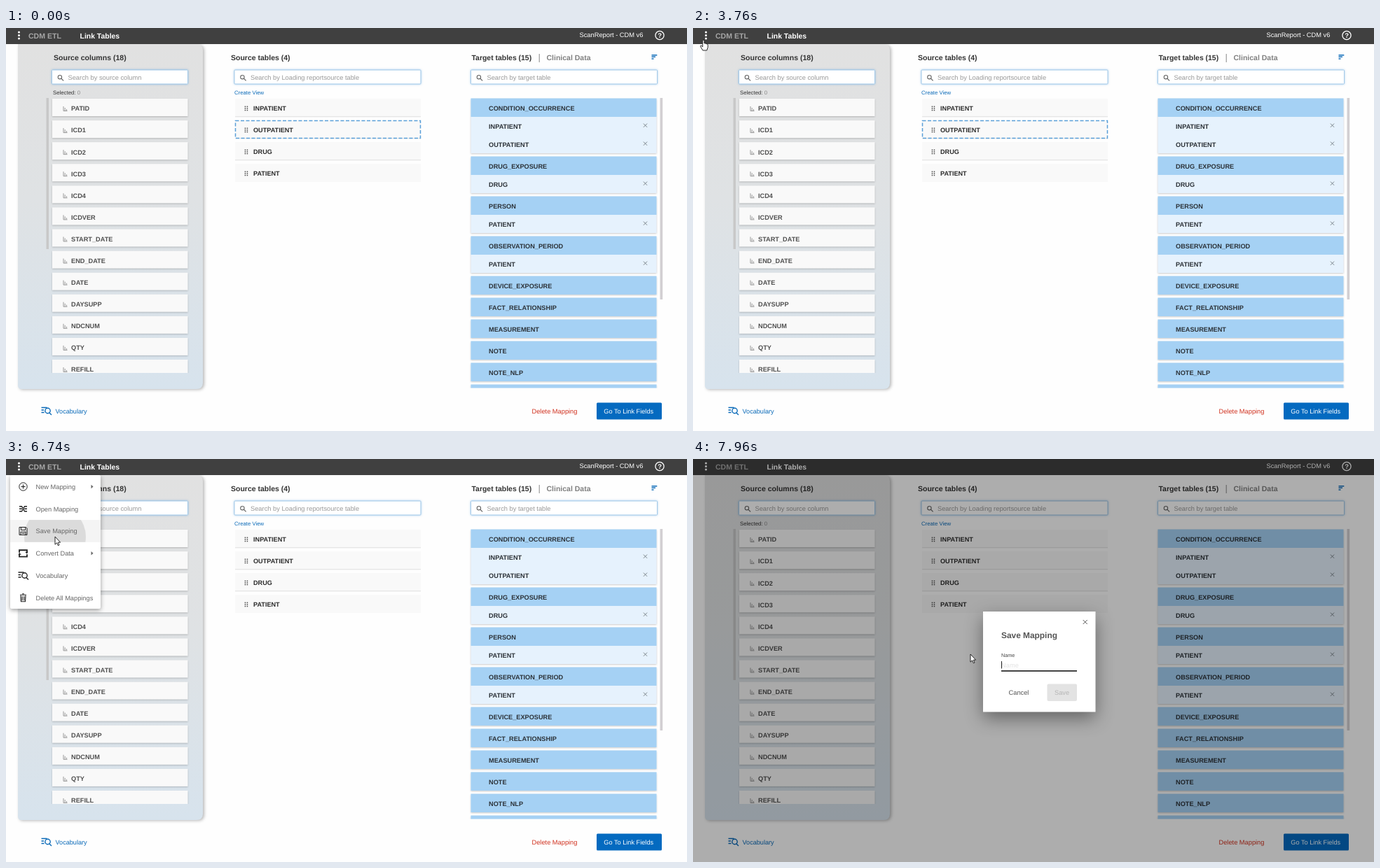
Animation, 972 px wide and 576 px high, one loop 8 s. Source, as an HTML page:

```html
<!DOCTYPE html>
<html lang="en">
<head>
<meta charset="utf-8">
<title>Link Tables</title>
<style>
  html, body { margin: 0; width: 100%; height: 100%; overflow: hidden; background: #fefefe; }
  svg { display: block; }
  text { font-family: "Liberation Sans", Arial, sans-serif; text-rendering: geometricPrecision; white-space: pre; }
  .panel { filter: drop-shadow(2px 1px 2px rgba(0,0,0,.28)); }
  .field { fill: #fff; stroke: #a3c9e8; filter: drop-shadow(0 0 1.5px rgba(70,150,215,.5)); }
  .card { filter: drop-shadow(0 1px 1px rgba(0,0,0,.2)); }
  .menu { filter: drop-shadow(0 2px 3px rgba(0,0,0,.38)); }
  .dialog { filter: drop-shadow(0 9px 13px rgba(0,0,0,.42)); }
</style>
</head>
<body>
<svg id="stage" width="972" height="576" viewBox="0 0 972 576"></svg>
<script>
const stage = document.getElementById('stage');
const LOOP = 8000;

// Drawing helpers
const text = (x, y, s, fill = '#333', size = 9.25, bold = false) =>
  `<text x="${x}" y="${y}" fill="${fill}" font-size="${size}"${bold ? ' font-weight="700"' : ''}>${s}</text>`;
const bold = (x, y, s, fill, size = 9.2) => text(x, y, s, fill, size, true);
const rect = (x, y, w, h, fill, extra = '') =>
  `<rect x="${x}" y="${y}" width="${w}" height="${h}" fill="${fill}" ${extra}/>`;
const line = (d, color, width = 1, extra = '') =>
  `<path d="${d}" fill="none" stroke="${color}" stroke-width="${width}" ${extra}/>`;
const at = (x, y, body) => `<g transform="translate(${x} ${y})">${body}</g>`;
const cross = (x, y, color, r = 2.6) =>
  at(x, y, line(`M${-r} ${-r}L${r} ${r}M${r} ${-r}L${-r} ${r}`, color, 1));
const lens = (x, y) => at(x, y, line('M1.6 1.6L4.6 4.6', '#666', 1.3) +
  '<circle cx="-.6" cy="-.6" r="2.7" fill="none" stroke="#666" stroke-width="1.1"/>');
const search = (x, w, hint) =>
  `<rect class="field" x="${x}" y="60" width="${w}" height="20" rx="1"/>` +
  lens(x + 12, 70.8) + text(x + 23, 73.5, hint, '#999', 9.3);

// Icons, centred on the origin
const icon = {
  vocabulary: c => line('M-7 -4.5H1M-7 -1H-3.5M-7 2.5H-3M4.2 2.8L7.5 6', c, 1.4) +
    `<circle cx="2" cy="0" r="3.7" fill="none" stroke="${c}" stroke-width="1.4"/>`,
  plus: c => `<circle r="5.7" fill="none" stroke="${c}"/>` + line('M-3 0H3M0 -3V3', c, 1.1),
  open: c => line('M-5.5 -3.5H-2L2 3.5H5.5M-5.5 3.5H-2L2 -3.5H5.5M-5.5 0H-1.5M1.5 0H5.5', c, 1.3),
  save: c => line('M-5.5 -5.5H4L5.5 -4V5.5H-5.5ZM-3 -5.5V-1.5H3V-5.5M-3.5 5.5V1.2H3.5V5.5M-2 3.3H2', c, 1),
  convert: c => line('M-5.5 -1V-4.5H5.5V-1M5.5 1.5V4.8H-5.5V1.5', c, 1.8) +
    `<path d="M2.6 -2H7L5.4 .8ZM-2.6 2H-7L-5.4 -.8Z" fill="${c}"/>`,
  trash: c => line('M-4.5 -4H4.5M-1.5 -5.5H1.5M-3.5 -3L-3 5.5H3L3.5 -3M-1.3 -2V4M1.3 -2V4', c, 1.2),
  scan: c => line('M-4.8 -1.5V-4.8H4.8V-1.5M-4.8 1.5V4.8H4.8V1.5M-5.8 0H5.8', c, 1.3),
  folder: c => line('M-5.5 4.5V-4.5H-1.5L0 -3H4V-1M-5.5 4.5L-3 -1H6L4 4.5Z', c, 1.1),
  version: c => `<circle r="5.7" fill="none" stroke="${c}"/>` + line('M-1.8 -1.8L0 2L1.8 -1.8', c, 1)
};

function header() {
  return rect(0, 0, 972, 23, '#404040') +
    [6, 10.5, 15].map(y => `<circle cx="18.5" cy="${y}" r="1.5" fill="#fff"/>`).join('') +
    bold(32, 14.5, 'CDM ETL', '#a6a6a6', 10.55) + bold(105.5, 14.5, 'Link Tables', '#fff', 10.45) +
    text(818.5, 13.4, 'ScanReport - CDM v6', '#fff', 9.3) +
    '<circle cx="933" cy="10.5" r="6.1" fill="none" stroke="#fff" stroke-width="1.3"/>' +
    bold(930.2, 14, '?', '#fff', 9.5);
}

function sourceColumns() {
  const names = ['PATID', 'ICD1', 'ICD2', 'ICD3', 'ICD4', 'ICDVER', 'START_DATE', 'END_DATE',
    'DATE', 'DAYSUPP', 'NDCNUM', 'QTY', 'REFILL'];
  const rows = names.map((name, i) => at(66, 101 + i * 31.08,
    rect(0, 0, 193.5, 25, '#f9f9f9', 'class="card"') +
    line('M16 11V17.5H21.5M18.2 13V17M20.5 15V17', '#999', 1) + bold(27, 17.4, name, '#505050')));
  return '<path class="panel" d="M17 23H272Q281 23 281 32V507Q281 516 272 516H22Q17 516 17 511Z" fill="url(#fade)"/>' +
    bold(68, 46.3, 'Source columns (18)', '#333', 10.55) + search(65.5, 194, 'Search by source column') +
    text(67, 95, 'Selected: <tspan fill="#888">0</tspan>', '#333', 7.8) +
    rect(57.5, 100, 3.5, 216, '#c8c8c8') + `<g clip-path="url(#listClip)">${rows.join('')}</g>`;
}

function sourceTables() {
  const rows = ['INPATIENT', 'OUTPATIENT', 'DRUG', 'PATIENT'].map((name, i) => {
    let dots = '';
    for (let k = 0; k < 6; k++) dots += rect(13.7 + k % 2 * 3, 10.6 + (k >> 1) * 2.6, 1.5, 1.5, '#444');
    return at(327, 101 + i * 31, rect(0, 0, 265, 26, '#f9f9f9') +
      (i < 3 ? rect(0, 25.3, 265, 1, '#dedede') : '') + dots + bold(26, 17.4, name, '#2c2c2c', 9.15));
  });
  return bold(321, 46.3, 'Source tables (4)', '#333', 10.5) +
    search(326, 266, 'Search by Loading reportsource table') +
    text(326, 95, 'Create View', '#0a6ab8', 7.75) + rows.join('') +
    '<rect id="dashes" x="327.5" y="132.5" width="264" height="25" fill="none" stroke="#5a9fd8" stroke-width="1.5" stroke-dasharray="5 2.5"/>';
}

function targetTables() {
  const tables = [['CONDITION_OCCURRENCE', 'INPATIENT', 'OUTPATIENT'], ['DRUG_EXPOSURE', 'DRUG'],
    ['PERSON', 'PATIENT'], ['OBSERVATION_PERIOD', 'PATIENT'], ['DEVICE_EXPOSURE'],
    ['FACT_RELATIONSHIP'], ['MEASUREMENT'], ['NOTE'], ['NOTE_NLP'], ['']];
  let y = 101, out = '';
  for (const [title, ...links] of tables) {
    out += rect(663.5, y, 265, 26 * (links.length + 1), '#e6f2fd', 'class="card"') +
      rect(663.5, y - .5, 265, 26.5, '#a5d1f4') + bold(689, y + 16.9, title, '#2c3238');
    links.forEach((name, i) => {
      const top = y + 26 * (i + 1);
      out += bold(689, top + 16.9, name, '#2c3238') + cross(912.5, top + 12.2, '#7c858c');
    });
    y += 26 * links.length + 31;
  }
  return bold(664.5, 46.3, 'Target tables (15)', '#333', 10.45) + rect(760.7, 37, 1, 12, '#888') +
    bold(771.5, 46.3, 'Clinical Data', '#808080', 10.5) +
    line('M921.5 38.7H929.3M921.5 41.3H927M921.5 43.9H924.5', '#0a6ab8', 1.5) +
    search(663.5, 266, 'Search by target table') +
    `<g clip-path="url(#targetClip)">${out}</g>` + rect(933.5, 100, 3.7, 288, '#d2cfd2');
}

function footer() {
  return at(57.5, 547, icon.vocabulary('#0a6ab8')) + text(70.5, 550.7, 'Vocabulary', '#0a6ab8', 9.15) +
    text(750.5, 550.7, 'Delete Mapping', '#d0311f', 9.28) +
    rect(843, 535.5, 93, 24, '#046ac0', 'rx="1.5"') + text(853.3, 550.7, 'Go To Link Fields', '#fff', 9.2);
}

function menuRows(items, iconX, textX, y) {
  return items.map(([kind, label, more], i) => {
    const cy = y + i * 31.75;
    return at(iconX, cy, icon[kind]('#222')) + text(textX, cy + 3.3, label, '#666') +
      (more ? `<path d="M121.5 ${cy - 2.7}L124.5 ${cy}L121.5 ${cy + 2.7}Z" fill="#666"/>` : '');
  }).join('');
}

function mainMenu() {
  return '<g id="menu">' + rect(6, 23, 129, 191, '#fff', 'rx="2" class="menu"') +
    '<rect id="hover" x="6" width="129" height="31.8" fill="#f4f4f4"/>' +
    '<circle id="ripple" cx="70" cy="111" fill="#000" fill-opacity=".1" clip-path="url(#saveClip)"/>' +
    menuRows([['plus', 'New Mapping', true], ['open', 'Open Mapping'], ['save', 'Save Mapping'],
      ['convert', 'Convert Data', true], ['vocabulary', 'Vocabulary'], ['trash', 'Delete All Mappings']],
      24.5, 42.5, 39.5) + '</g>';
}

function subMenu() {
  return '<g id="submenu">' + rect(135, 18, 135, 127, '#fff', 'rx="2" class="menu"') +
    menuRows([['plus', 'Create New Mapping'], ['scan', 'Scan Data'], ['folder', 'Load New Report'],
      ['version', 'Set CDM Version']], 153.5, 172, 34) + '</g>';
}

function dialog() {
  return '<g id="dialog">' + rect(414, 218, 160.5, 143.5, '#fff', 'class="dialog"') +
    cross(559.7, 233, '#555', 3) + bold(440, 255.7, 'Save Mapping', '#555', 11.9) +
    '<g id="hint">' + text(440, 297.5, 'Name', '#e2e2e2', 9.3) + '</g>' +
    '<g id="label"><text font-size="9.3">Name</text></g>' +
    rect(440, 302.3, 108, 1, '#999') + '<rect id="underline" y="302" height="1.8" fill="#333"/>' +
    '<rect id="caret" x="440" y="289" width="1" height="10.5" fill="#222"/>' +
    text(450.5, 337, 'Cancel', '#555', 9.3) + rect(505.5, 321.5, 42.5, 24.5, '#e3e3e3', 'rx="2"') +
    text(516, 337, 'Save', '#b5b5b5', 9.25) + '</g>';
}

stage.innerHTML = `<defs>
  <linearGradient id="fade" x2="0" y2="1"><stop stop-color="#e1e1e1"/><stop offset=".45" stop-color="#dfe2e4"/><stop offset="1" stop-color="#d7e3ed"/></linearGradient>
  <clipPath id="listClip"><rect x="60" y="98" width="205" height="395"/></clipPath>
  <clipPath id="targetClip"><rect x="660" y="98" width="272" height="416.5"/></clipPath>
  <clipPath id="saveClip"><rect x="6" y="87" width="129" height="31.8"/></clipPath></defs>` +
  sourceColumns() + sourceTables() + targetTables() + footer() + header() +
  `<g id="tooltip">${rect(-21.5, -6, 43, 12, '#bcbabb', 'rx="1.5"')}${text(-18.5, 1.7, 'device_exposure', '#eee', 4.9)}</g>` +
  mainMenu() + subMenu() + rect(0, 0, 972, 576, '#000', 'id="backdrop"') + dialog() +
  `<g id="arrow"><path d="M0 0V11.2L2.6 8.8L4.3 12.7L6 12L4.3 8.2H7.6Z" fill="#fff" stroke="#111" stroke-width=".9"/></g>
  <g id="hand"><path d="M-1.2 .8Q0 -.8 1.1 .8V5Q2.4 4.2 3 5.4Q4.4 4.8 4.8 6.1Q6.2 5.8 6.2 7.3V10.5L4.8 15H-1L-4 10Q-5 7.8 -3.2 7.9L-1.2 10Z" fill="#fff" stroke="#111" stroke-width=".9"/></g>`;

const el = id => document.getElementById(id);
const set = (id, attrs) => { for (const k in attrs) el(id).setAttribute(k, attrs[k]); };
const show = (id, on) => { el(id).style.display = on ? '' : 'none'; };

// Timing helpers
const progress = (t, start, length) => Math.min(1, Math.max(0, (t - start) / length));
const out = (u, power = 3) => 1 - (1 - u) ** power;
const scaleAbout = (x, y, s) => `translate(${x} ${y}) scale(${s}) translate(${-x} ${-y})`;

// Pointer path: time, x, y
const path = [[420, 961, 574], [470, 966, 574], [650, 970, 385], [710, 970, 387], [960, 966, 386],
  [1150, 930, 230], [1350, 885, 67], [1550, 845, 260], [1750, 823, 369], [1820, 823, 369], [1940, 916, 321],
  [2130, 918, 205], [2400, 921, 50], [2550, 921, 8], [2730, 921, 8], [2980, 600, 484], [3450, 10, 17],
  [3580, 7, 17], [3740, 15, 17], [3950, 14, 16], [4090, 14, 16], [4150, 18, 13.5], [4950, 18, 13.5],
  [5080, 52, 40], [5260, 60, 45], [5360, 67, 85], [5390, 67, 85], [5540, 70, 108], [5730, 70, 111],
  [7000, 70, 111], [7360, 181, 187], [7420, 181, 187], [7940, 396, 279], [8000, 396, 279]];
const hidden = [[0, 420], [470, 650], [710, 960], [1940, 2130]];

function pointer(t) {
  const i = Math.max(1, path.findIndex(p => p[0] >= t));
  const [a, b] = [path[i - 1], path[i]];
  const u = progress(t, a[0], b[0] - a[0]), s = u * u * (3 - 2 * u);
  return `translate(${a[1] + (b[1] - a[1]) * s} ${a[2] + (b[2] - a[2]) * s})`;
}

function render(t) {
  const visible = !hidden.some(([a, b]) => t >= a && t < b);
  const isHand = t >= 3400 && t < 5920;
  show('arrow', visible && !isHand);
  show('hand', visible && isHand);
  set(isHand ? 'hand' : 'arrow', { transform: pointer(t) });

  show('tooltip', t >= 1750 && t < 1940);
  set('tooltip', { transform: `translate(658.5 368) scale(${.05 + .95 * progress(t, 1750, 60)})`,
    opacity: 1 - progress(t, 1830, 100) });

  show('dashes', t < 4420);
  const menuIn = progress(t, 4400, 120), menuOut = progress(t, 6775, 100);
  show('menu', menuIn > 0 && menuOut < 1);
  set('menu', { opacity: menuIn - menuOut, transform: scaleAbout(6, 23, .8 + .2 * out(menuIn)) });
  show('hover', t >= 5020);
  set('hover', { y: 23.6 + 31.75 * (t < 5310 ? 0 : t < 5480 ? 1 : 2) });
  set('ripple', { r: 69 * out(progress(t, 6600, 450), 2.7) });

  const subIn = progress(t, 5120, 120), subOut = progress(t, 5365, 100);
  show('submenu', subIn > 0 && subOut < 1);
  set('submenu', { opacity: subIn - subOut, transform: scaleAbout(135, 18, .8 + .2 * out(subIn)) });

  set('backdrop', { opacity: .32 * out(progress(t, 6750, 400), 4) });
  const open = out(progress(t, 6770, 150)), float = out(progress(t, 6930, 400));
  show('dialog', open > 0);
  set('dialog', { opacity: open, transform: scaleAbout(494.2, 289.8, .7 + .3 * open) });
  set('label', { transform: `translate(440 ${297.5 - 14.3 * float}) scale(${1 - .22 * float})`,
    fill: float > 0 ? '#444' : '#999' });
  set('hint', { opacity: float });
  const half = 54 * out(progress(t, 6930, 300));
  set('underline', { x: 494 - half, width: half * 2 });
  show('caret', t >= 6930 && (t - 6930) % 1000 < 500);
}

const begin = performance.now();
(function tick() {
  render((performance.now() - begin) % LOOP);
  requestAnimationFrame(tick);
})();
</script>
</body>
</html>
```
